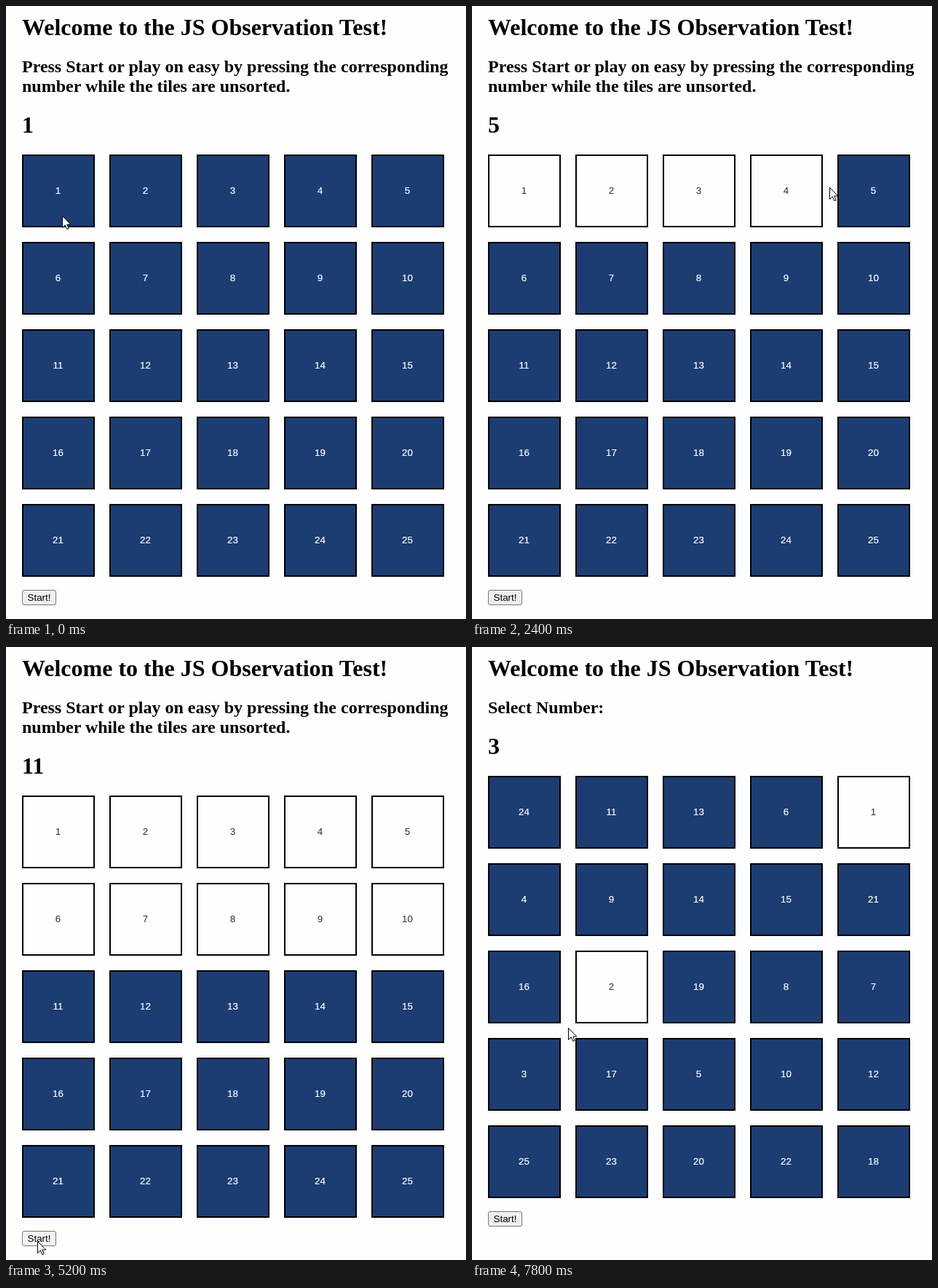
An HTML page for the animation above (8000 ms loop, 632 by 842 pixels).

```html
<!DOCTYPE html>
<html lang="en">
<head>
<meta charset="utf-8">
<title>Observation Test</title>
<style>
  html, body { margin: 0; width: 100%; height: 100%; overflow: hidden; background: #fefefe; }
  body { position: relative; color: #000; }
  h1, h2, #board, .tile, #start, #cursor { position: absolute; margin: 0; box-sizing: border-box; }
  h1, h2 { left: 22px; font-family: "Liberation Serif", "Times New Roman", serif; font-weight: bold; white-space: pre; }
  h1 { font-size: 32px; line-height: 36px; top: 11px; }
  h2 { font-size: 24px; line-height: 27px; top: 70px; }
  #board { left: 0; top: 0; }
  #count { top: 145px; }
  .tile, #start { font: 13.333px/15px "Liberation Sans", Arial, sans-serif; text-align: center; }
  .tile { width: 100px; height: 100px; padding: 40px 1px 0 0; border: 2px solid #000; background: #1b3d72; color: #fff; -webkit-text-stroke: .2px; }
  .tile.done { background: #fefefe; color: #222c40; -webkit-text-stroke: 0; }
  #start { left: 22px; top: 802px; width: 47px; height: 21px; padding-top: 2px; border: 1px solid #767676; border-radius: 3px; background: #efefef; }
  #start.pressed { background: #f5f5f5; }
  #cursor { left: 0; top: 0; }
</style>
</head>
<body>
<h1>Welcome to the JS Observation Test!</h1>
<h2 id="hint"></h2>
<div id="board">
  <h1 id="count"></h1>
  <div id="start">Start!</div>
</div>
<svg id="cursor" width="14" height="21">
  <path d="M.5 .5V16.5L4.3 12.9L6.8 18.6L9.2 17.6L6.8 12H11.8Z" fill="#fff" stroke="#000"/>
</svg>
<script>
const LOOP = 8000, STEP = 200, SHUFFLE_AT = 5400;
const EASY_HINT = "Press Start or play on easy by pressing the corresponding\nnumber while the tiles are unsorted.";
const SHUFFLED = "24 11 13 6 1 4 9 14 15 21 16 2 19 8 7 3 17 5 10 12 25 23 20 22 18".split(" ");

// Pointer turning points: time, x, y
const PATH = [
  [800, 77, 288], [1600, 274, 245], [2600, 545, 250], [2950, 90, 365],
  [3200, 211, 359], [4000, 421, 359], [4600, 545, 365], [5000, 43, 816],
  [5600, 43, 816], [6600, 547, 235], [6800, 547, 235], [7400, 190, 470], [7800, 132, 523]
];

const get = id => document.getElementById(id);
const hint = get("hint"), board = get("board"), count = get("count");
const start = get("start"), cursor = get("cursor");

const tiles = SHUFFLED.map((_, i) => {
  const tile = document.createElement("div");
  tile.className = "tile";
  tile.style.left = 22 + i % 5 * 120 + "px";
  tile.style.top = 204 + Math.floor(i / 5) * 120 + "px";
  return board.appendChild(tile);
});

// Clicks made by time t when they start at `first`, repeat every `gap` and stop at `max`
const clicks = (t, first, gap, max) =>
  Math.min(max, Math.max(0, Math.floor((t - first) / gap) + 1));

function pointerAt(t) {
  const next = Math.max(1, PATH.findIndex(point => point[0] >= t));
  const [t0, x0, y0] = PATH[next - 1], [t1, x1, y1] = PATH[next];
  const p = Math.max(0, (t - t0) / (t1 - t0));
  return [x0 + (x1 - x0) * p, y0 + (y1 - y0) * p].map(Math.round);
}

function render(t) {
  const hard = t >= SHUFFLE_AT;
  const found = hard ? clicks(t, 6800, 600, 2) : clicks(t, 1000, 400, 10);
  hint.textContent = hard ? "Select Number:" : EASY_HINT;
  count.textContent = found + 1;
  board.style.top = hard ? "-27px" : "0";
  tiles.forEach((tile, i) => {
    const number = hard ? SHUFFLED[i] : i + 1;
    tile.textContent = number;
    tile.classList.toggle("done", number <= found);
  });
  start.classList.toggle("pressed", t >= SHUFFLE_AT - STEP && !hard);
  const [x, y] = pointerAt(t);
  cursor.style.transform = `translate(${x}px, ${y}px)`;
}

const origin = performance.now();
let shown = -1;
function tick() {
  const t = Math.floor((performance.now() - origin) % LOOP / STEP) * STEP;
  if (t !== shown) render(shown = t);
  requestAnimationFrame(tick);
}
tick();
</script>
</body>
</html>
```
